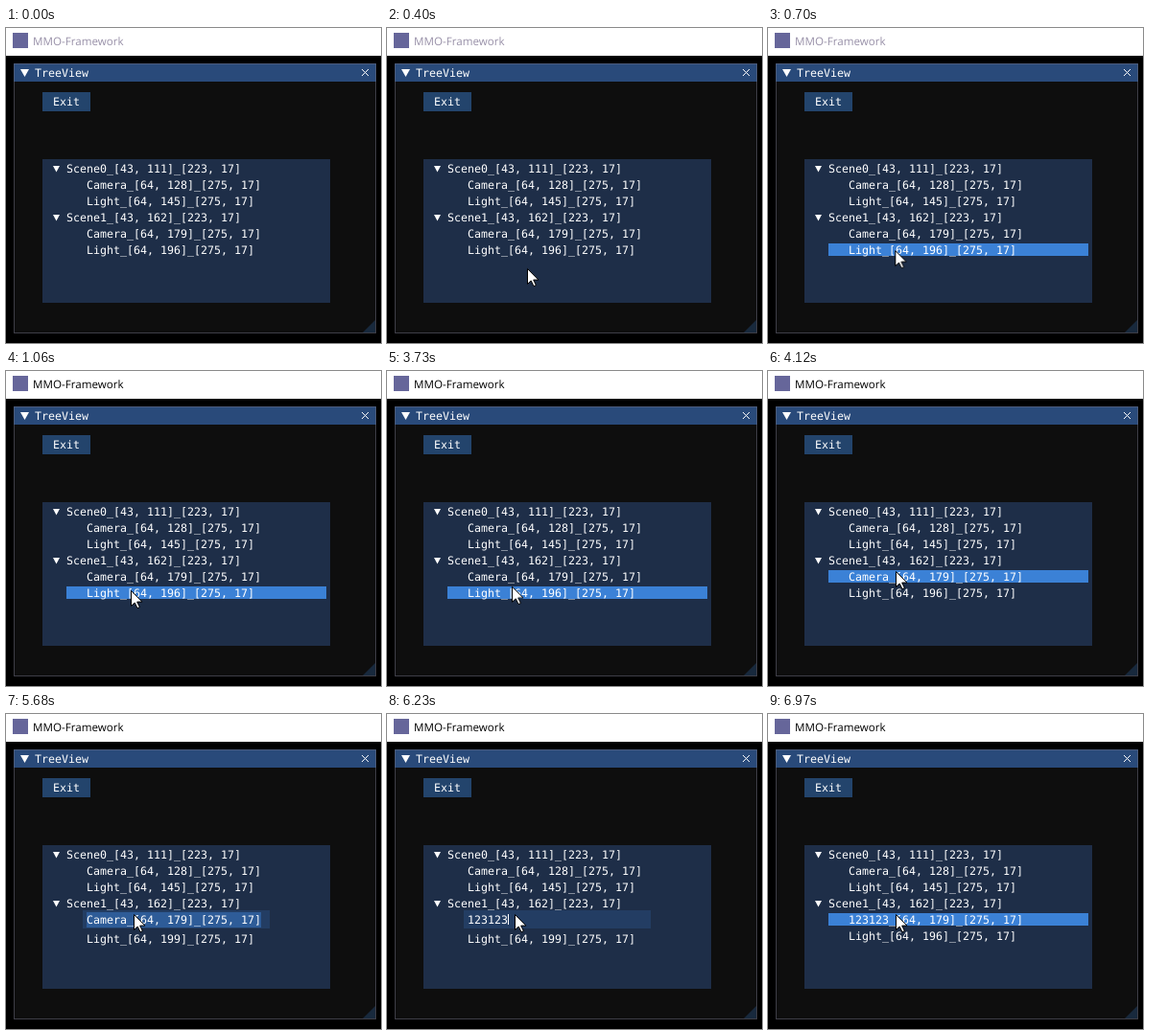
An HTML page that plays this animation: 391 by 329 pixels, repeating every 8000 ms.

```html
<!DOCTYPE html>
<html lang="en">
<head>
<meta charset="utf-8">
<title>TreeView</title>
<style>
html, body { margin: 0; width: 100%; height: 100%; overflow: hidden; background: #000; }
svg { display: block; width: 391px; height: 329px; }
rect { shape-rendering: crispEdges; }
text {
  font: 11.63px "DejaVu Sans Mono", monospace;
  fill: #fff;
  white-space: pre;
  text-rendering: geometricPrecision;
}
.caption { font: 11.6px "Open Sans", sans-serif; }
.hover { fill: #3b81d6; }
.field { fill: #233d63; }

/* All timelines share one 8 s loop; 1% = 80 ms. */
.step { animation: 8s step-end infinite; }
.caption { animation-name: focus; }
.idle { animation-name: idle; }
.edit { animation-name: edit; }
.old { animation-name: old; }
.new { animation-name: new; }
.hover-light { animation-name: hover-light; }
.hover-camera { animation-name: hover-camera; }
.selected { animation-name: selected; }
.blink { animation-name: blink; }
.typed { animation-name: typed; }
.typing { animation-name: typing; }
.pointer { animation: move 8s linear infinite; }

@keyframes focus { 0% { fill: #9890a8 } 12.125%, 100% { fill: #000 } }
@keyframes idle { 0% { opacity: 1 } 57.375% { opacity: 0 } 87.125%, 100% { opacity: 1 } }
@keyframes edit { 0% { opacity: 0 } 57.375% { opacity: 1 } 87.125%, 100% { opacity: 0 } }
@keyframes old { 0% { opacity: 1 } 57.375%, 100% { opacity: 0 } }
@keyframes new { 0% { opacity: 0 } 87.125%, 100% { opacity: 1 } }
@keyframes hover-light { 0% { opacity: 0 } 7.1% { opacity: 1 } 47.05%, 100% { opacity: 0 } }
@keyframes hover-camera { 0% { opacity: 0 } 47.5%, 100% { opacity: 1 } }
@keyframes selected { 0% { opacity: 1 } 73.125%, 100% { opacity: 0 } }
@keyframes blink { 0% { opacity: 1 } 71%, 100% { opacity: 0 } }
@keyframes typed { 0% { opacity: 0 } 73.125%, 100% { opacity: 1 } }
@keyframes typing {
  0% { transform: translateX(0) }
  73.125% { transform: translateX(7px) }
  73.8% { transform: translateX(14px) }
  74.5% { transform: translateX(21px) }
  76.625% { transform: translateX(28px) }
  77.25% { transform: translateX(35px) }
  77.875%, 100% { transform: translateX(42px) }
}
@keyframes move {
  0%, 1.99% { transform: translate(246px, 335px) }
  2% { transform: translate(230px, 316px) }
  5% { transform: translate(146px, 251px); animation-timing-function: ease-out }
  10.5%, 46.62% { transform: translate(130px, 229px) }
  46.625% { transform: translate(130px, 225px); animation-timing-function: ease-out }
  48.9% { transform: translate(132px, 202px); animation-timing-function: ease-in-out }
  51.5%, 100% { transform: translate(133px, 209px) }
}
</style>
</head>
<body>
<svg viewBox="0 0 391 329">
  <!-- system caption -->
  <rect width="391" height="29" fill="#fff"/>
  <rect x="7" y="5" width="16" height="16" fill="#66669a"/>
  <text class="caption step" x="28" y="18">MMO-Framework</text>

  <!-- window -->
  <rect x="8" y="37" width="378" height="282" fill="#0e0e0e"/>
  <rect x="8" y="37" width="378" height="19" fill="#294a7a"/>
  <path d="M385 305V318H372Z" fill="#18293d"/>
  <rect x="8.5" y="37.5" width="377" height="281" fill="none" stroke="#6e6e80" stroke-opacity=".5"/>
  <path d="M15 43H24L19.5 51Z" fill="#fff"/>
  <text x="30" y="51">TreeView</text>
  <path d="M371 43L378 50M378 43L371 50" stroke="#fff"/>
  <rect x="38" y="67" width="50" height="20" fill="#23446c"/>
  <text x="49" y="81">Exit</text>

  <!-- tree -->
  <rect x="38" y="137" width="300" height="150" fill="#1e2e48"/>
  <path d="M49 144H56L52.5 150.5ZM49 195H56L52.5 201.5Z" fill="#fff"/>
  <text x="63" y="151">Scene0_[43, 111]_[223, 17]</text>
  <text x="84" y="168">Camera_[64, 128]_[275, 17]</text>
  <text x="84" y="185">Light_[64, 145]_[275, 17]</text>
  <text x="63" y="202">Scene1_[43, 162]_[223, 17]</text>

  <g class="idle step">
    <rect class="hover hover-camera step" x="63" y="208" width="271" height="13"/>
    <rect class="hover hover-light step" x="63" y="225" width="271" height="13"/>
    <text class="old step" x="84" y="219">Camera</text>
    <text class="new step" x="84" y="219">123123</text>
    <text x="126" y="219">_[64, 179]_[275, 17]</text>
    <text x="84" y="236">Light_[64, 196]_[275, 17]</text>
  </g>

  <!-- rename field -->
  <g class="edit step">
    <rect class="field" x="80" y="205" width="195" height="19"/>
    <g class="selected step">
      <rect x="84" y="207" width="182" height="16" fill="#2e5c98"/>
      <text x="84" y="219">Camera_[64, 179]_[275, 17]</text>
      <rect class="blink step" x="266" y="209" width="1" height="11" fill="#fff"/>
    </g>
    <!-- a cover slides right with the caret to reveal each key -->
    <g class="typed step">
      <text x="84" y="219">123123</text>
      <g class="typing step">
        <rect class="field" x="84" y="207" width="50" height="16"/>
        <rect x="84" y="209" width="1" height="11" fill="#fff"/>
      </g>
    </g>
    <text x="84" y="239">Light_[64, 199]_[275, 17]</text>
  </g>

  <path class="pointer" d="M.5 .5V16.5L4.2 13L7 18.7L9.4 17.6L6.7 12.1H11.9Z" fill="#fff" stroke="#000"/>
</svg>
</body>
</html>
```
